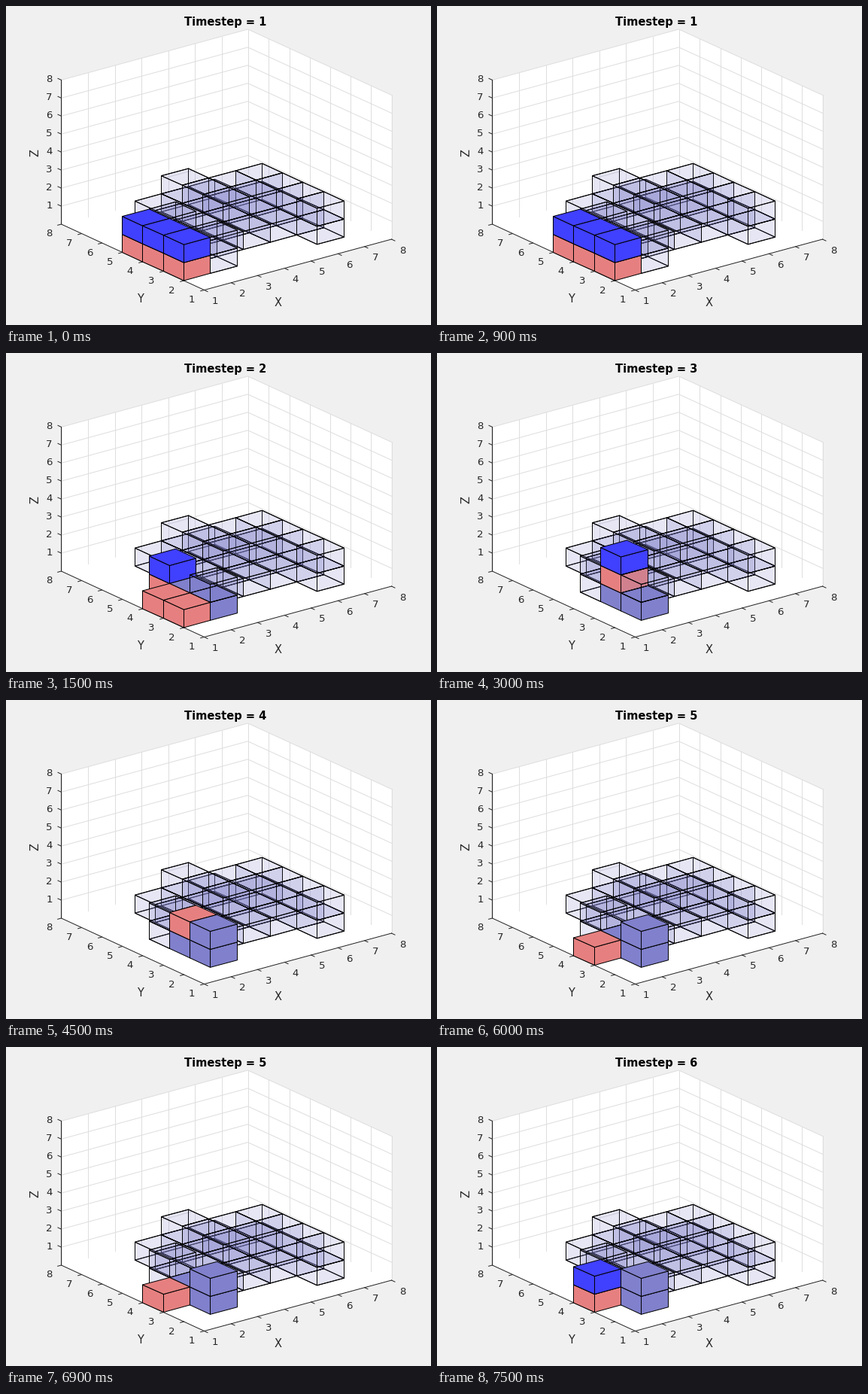
Animation, 565 px wide and 424 px high, one loop 8000 ms. Source, as a matplotlib script:

```python
import numpy as np
import matplotlib.pyplot as plt
from matplotlib.animation import FuncAnimation
from matplotlib.collections import PolyCollection

W, H, DPI = 565, 424, 100
PX = 72 / DPI

ORIGIN = np.array([263.5, 377.5])
AXES = np.array([[35.5, -9.64], [-27.2, -12.5], [0, -23.95]])

INK = (0.15, 0.15, 0.15)
GRID = (0.87, 0.87, 0.87)
GHOST = (0.5, 0.5, 0.8, 0.1)
PLACED = (0.5, 0.5, 0.8, 1)
ROBOT = (0.9, 0.5, 0.5, 1)
CARRIED = (0.25, 0.25, 1, 1)

# Planned structure: (first x, last x, y, z) per row of cells
ROWS = [(1, 1, 1, 0), (5, 5, 1, 0), (1, 5, 2, 0), (1, 5, 3, 0),
        (2, 5, 4, 0), (2, 4, 5, 0),
        (1, 1, 1, 1), (5, 5, 1, 1), (5, 5, 2, 1), (1, 1, 3, 1),
        (3, 5, 3, 1), (3, 5, 4, 1), (3, 3, 5, 1)]
PLAN = {(x, y, z) for x0, x1, y, z in ROWS for x in range(x0, x1 + 1)}

# Per timestep: robots, carried blocks, placed blocks
BASE = [(1, 1, 0), (1, 2, 0)]
TOWER = BASE + [(1, 1, 1)]
STEPS = [
    ([(0, 1, 0), (0, 2, 0), (0, 3, 0)], [(0, 1, 1), (0, 2, 1), (0, 3, 1)], []),
    ([(0, 1, 0), (0, 2, 0), (1, 3, 0)], [(1, 3, 1)], BASE),
    ([(1, 2, 1)], [(1, 2, 2)], BASE),
    ([(1, 2, 1)], [], TOWER),
    ([(0, 2, 0)], [], TOWER),
    ([(0, 2, 0)], [(0, 2, 1)], TOWER),
]


def project(points):
    """Cell coordinates (x, y, z) to stage pixels, y downwards."""
    p = ORIGIN + np.asarray(points, float) @ AXES
    p[..., 0] = np.floor(p[..., 0]) + 0.5
    return p


def face(axis, side):
    """Corners of a unit cube's face across one axis."""
    u, v = [k for k in range(3) if k != axis]
    corners = np.zeros((4, 3))
    corners[:, axis] = side
    corners[:, u] = [0, 1, 1, 0]
    corners[:, v] = [0, 0, 1, 1]
    return corners


BACK = [face(2, 0), face(0, 1), face(1, 1)]
FRONT = [face(1, 0), face(0, 0), face(2, 1)]


def cube_faces(step):
    """Polygons and colours of all cubes, far to near."""
    cells = {c: GHOST for c in PLAN}
    for group, colour in zip(STEPS[step], (ROBOT, CARRIED, PLACED)):
        cells.update({c: colour for c in group})
    verts, colours = [], []
    for cell in sorted(cells, key=lambda c: (-c[0], -c[1], c[2])):
        colour = cells[cell]
        faces = BACK + FRONT if colour[3] < 1 else FRONT
        for f in faces:
            verts.append(project(f + np.array(cell)))
            colours.append(colour)
    return verts, colours


fig = plt.figure(figsize=(W / DPI, H / DPI), dpi=DPI, facecolor="#f0f0f0")
ax = fig.add_axes([0, 0, 1, 1])
ax.set_xlim(0, W)
ax.set_ylim(H, 0)
ax.axis("off")
plt.rcParams["font.family"] = "DejaVu Sans"


def line(points, colour, width=1.0, z=1):
    p = project(points)
    ax.plot(p[:, 0], p[:, 1], color=colour, lw=width * PX, zorder=z)


def label(x, y, text, size, **kw):
    style = dict(color=INK, ha="center", va="center_baseline")
    style.update(kw)
    return ax.text(x, y, text, fontsize=size * PX, zorder=5, **style)


def tick(at, way, shift, text):
    p = project(at)
    q = p + way
    ax.plot([p[0], q[0]], [p[1], q[1]], color=INK, lw=PX, zorder=2)
    label(p[0] + shift[0], p[1] + shift[1], text, 13.33)


# Box: floor and the two rear walls
hull = [(0, 0, 0), (7, 0, 0), (7, 0, 8), (7, 7, 8), (0, 7, 8), (0, 7, 0)]
ax.add_patch(plt.Polygon(project(hull), fc="white", ec="none", zorder=0))
for k in range(8):
    line([(k, 7, 0), (k, 7, 8)], GRID)
    line([(7, k, 0), (7, k, 8)], GRID)
for k in range(1, 9):
    line([(0, 7, k), (7, 7, k), (7, 0, k)], GRID)
line([(7, 0, 0), (0, 0, 0), (0, 7, 0), (0, 7, 8)], INK, z=2)

for k in range(8):
    n = str(k + 1)
    tick((k, 0, 0), (4.5, 2.1), (14.5, 13.5), n)
    tick((0, k, 0), (-4.8, 1.3), (-16.5, 11.5), n)
    tick((0, 7, k + 1), (-4.5, -2.1), (-16, -2.5), n)

label(362, 393, "X", 14.67)
label(178.5, 388, "Y", 14.67)
label(39, 195, "Z", 14.67, rotation=90, va="center")
title = label(291.5, 20, "", 14.67, color="black", weight="bold")

cubes = PolyCollection([], edgecolors="black", linewidths=PX, zorder=3)
ax.add_collection(cubes, autolim=False)


def update(i):
    step = i // 3
    verts, colours = cube_faces(step)
    cubes.set_verts(verts)
    cubes.set_facecolor(colours)
    title.set_text(f"Timestep = {step + 1}")
    return cubes, title


anim = FuncAnimation(fig, update, frames=16, interval=500, repeat=True,
                     repeat_delay=0, blit=False)
plt.show()
```
